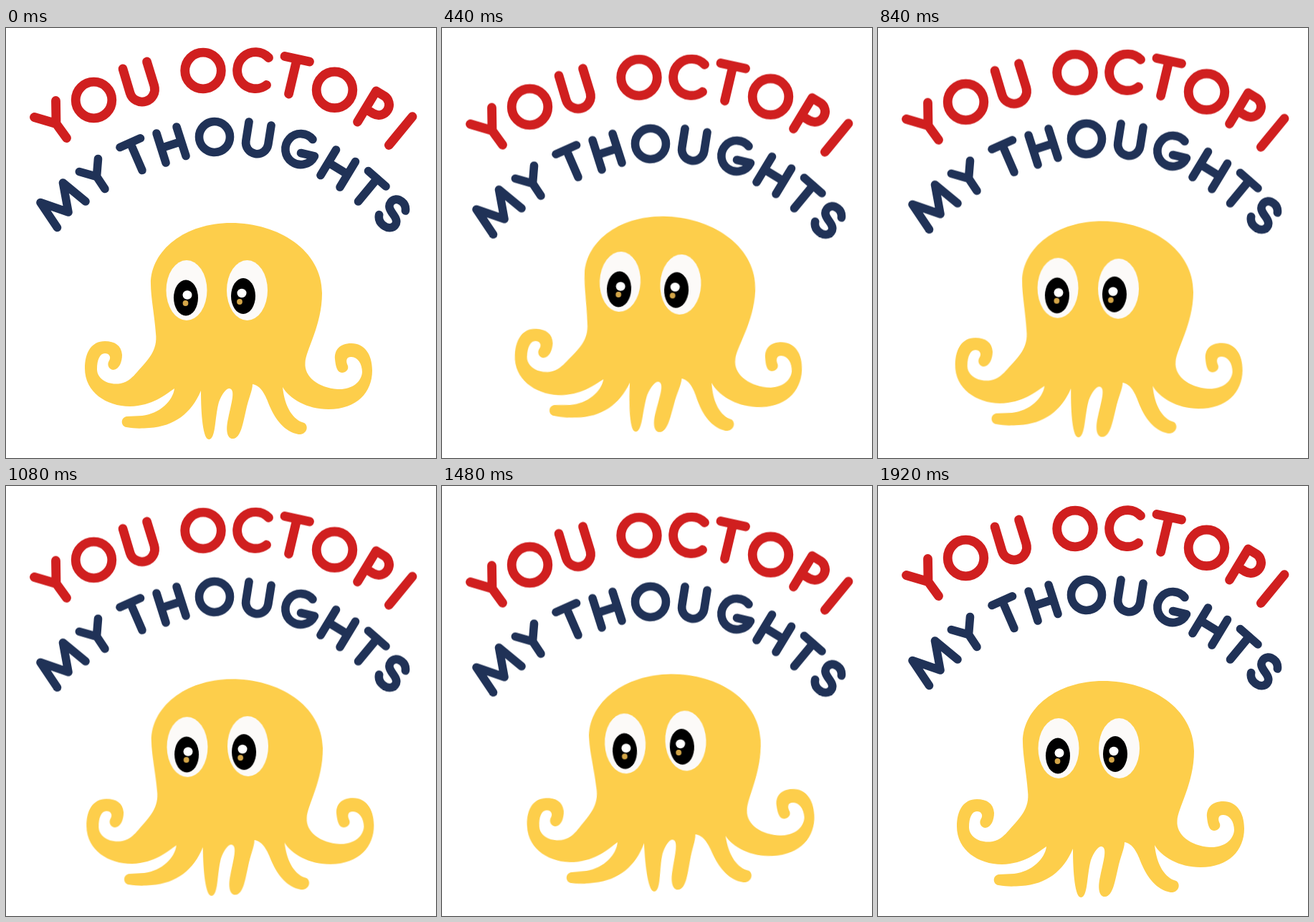
Recreate the animation shown at these times as an HTML page. Size 600x600 px, loop 1.96 s.

```html
<!DOCTYPE html>
<html lang="en">
<head>
<meta charset="utf-8">
<title>You octopi my thoughts</title>
<style>
  html, body { margin: 0; width: 100%; height: 100%; overflow: hidden; background: #fff; }
  svg { display: block; width: 100vw; height: 100vh; }

  .lettering, .octopus { animation: 1960ms steps(12, end) infinite; }
  .lettering {
    animation-name: bob;
    fill: none;
    stroke-linecap: round;
    stroke-linejoin: round;
  }
  .octopus { animation-name: rock; transform-origin: 310.5px 423px; }
  .red { stroke: #d01f1f; stroke-width: 12.8; }
  .navy { stroke: #203257; stroke-width: 11.6; }

  /* Four legs of 480 ms, then one resting step of 40 ms */
  @keyframes bob {
    0%, 48.9796%, 97.9592%, 100% { transform: translateY(0); }
    24.4898%, 73.4694% { transform: translateY(10.4px); }
  }
  @keyframes rock {
    0%, 48.9796%, 97.9592%, 100% { transform: translate(0, 0) rotate(0deg); }
    24.4898% { transform: translate(-6.7px, -10.2px) rotate(2.85deg); }
    73.4694% { transform: translate(6.7px, -10.2px) rotate(-2.85deg); }
  }
</style>
</head>
<body>
<svg viewBox="0 0 600 600">
  <g class="lettering" role="img" aria-label="You octopi my thoughts">
    <g class="red">
      <!-- YOU -->
      <path d="M39.5 124.5L70 133.5L69.5 101.5M70 133.5L84.5 153.5"/>
      <circle cx="122.5" cy="100.5" r="25.3"/>
      <path d="M163 57L173 90.5A17.6 17.6 0 0 0 206.8 80.5L196.5 47"/>
      <!-- OCTOPI -->
      <circle cx="275" cy="59.5" r="25.3"/>
      <path d="M366.5 41.5A25.5 25.5 0 1 0 363.5 79.5"/>
      <path d="M389 39.5L423.5 47M406 43.3L394.5 92"/>
      <circle cx="458.5" cy="86.3" r="25.3"/>
      <path d="M490.5 131L516.5 88L528 94.9A14.5 14.5 0 0 1 513 119.7L501.5 112.8"/>
      <path d="M567 123.7L534.3 163.5"/>
    </g>
    <g class="navy">
      <!-- MY -->
      <path d="M71.5 278.5L48 243.5L87 257L79.5 216L111 242"/>
      <path d="M102.3 200.5L126.5 207.3L128.5 182.5M126.5 207.3L138 224.5"/>
      <!-- THOUGHTS -->
      <path d="M159 166.5L187.5 153.8M173.3 160L190 198.5"/>
      <path d="M210 147L223 188M238 138L251 178.5M216.5 167.5L244.5 158.5"/>
      <circle cx="291" cy="152" r="21.5"/>
      <path d="M339 131L334.8 157.5A15.7 15.7 0 0 0 365.8 162.5L370 136"/>
      <path d="M428 155.5A21.5 21.5 0 1 0 430.5 178.8L411.5 174.5"/>
      <path d="M460.5 170L439 205.5M487.5 186.5L466 222M449.8 187.7L476.8 204.2"/>
      <path d="M505.5 199.5L530 221M517.8 210.2L491.5 242"/>
      <path transform="translate(539.3 258.7) rotate(38)"
        d="M12-14C9-19 5-21 0-21C-7-21-11.5-17-11.5-11C-11.5-4-6-2 0 0C7 2 13 4 13 11C13 17 7 21 0 21C-6 21-11 18-13.5 13"/>
    </g>
  </g>

  <g class="octopus">
    <path fill="#fdce4b" d="M314 272
      C250 272 202 310 202 357C202 375 207 400 209 426
      C212 450 198 463 183 480C177 487 170 494 160 496
      C141 499 127 489 127 476C127 463 131 454 138 454
      C144 454 147 459 144 464C140 470 144 477 150 477
      C158 476 162 466 162 456C161 443 152 437 138 437
      C119 437 110 453 110 475C110 508 140 528 173 528
      C205 527 222 512 235 503
      C233 520 215 538 190 541L169 542C159 543 160 556 168 557
      C180 559 187 559 200 558C235 556 259 537 272 506
      C272 540 275 574 283 574C293 574 291 544 297 522
      C302 508 310 500 314 504C319 508 315 522 310 545
      C306 562 309 574 317 573C327 572 330 555 334.5 535
      C338.5 516 344 506 344 497C356 499 362 512 368 528
      C376 546 388 563 408 567C420 568 423 555 416 551
      C401 547 389 530 386 501
      C395 517 420 532 450 532C490 532 511 508 511 478
      C511 455 500 440 482 440C465 440 458 450 459 462
      C460 472 462 481 469 481C477 480 479 474 476 469
      C474 463 476 459 481 459C490 458 497 468 497 480
      C496 495 481 505 463 504C436 502 416 487 417.5 467
      C418 450 441 415 441 370C441 310 380 272 314 272Z"/>
    <g fill="#fcfaf8">
      <ellipse cx="252" cy="366" rx="28.5" ry="42"/>
      <ellipse cx="336.5" cy="366" rx="28.5" ry="42"/>
    </g>
    <ellipse cx="251" cy="376.5" rx="17" ry="25"/>
    <ellipse cx="331" cy="374" rx="17" ry="25"/>
    <g fill="#fff">
      <ellipse cx="253" cy="372.5" rx="6.5" ry="6.2"/>
      <ellipse cx="329" cy="370" rx="6.5" ry="6.2"/>
    </g>
    <g fill="#d3a548">
      <circle cx="250.5" cy="384" r="3.9"/>
      <circle cx="326" cy="382" r="3.9"/>
    </g>
  </g>
</svg>
</body>
</html>
```
